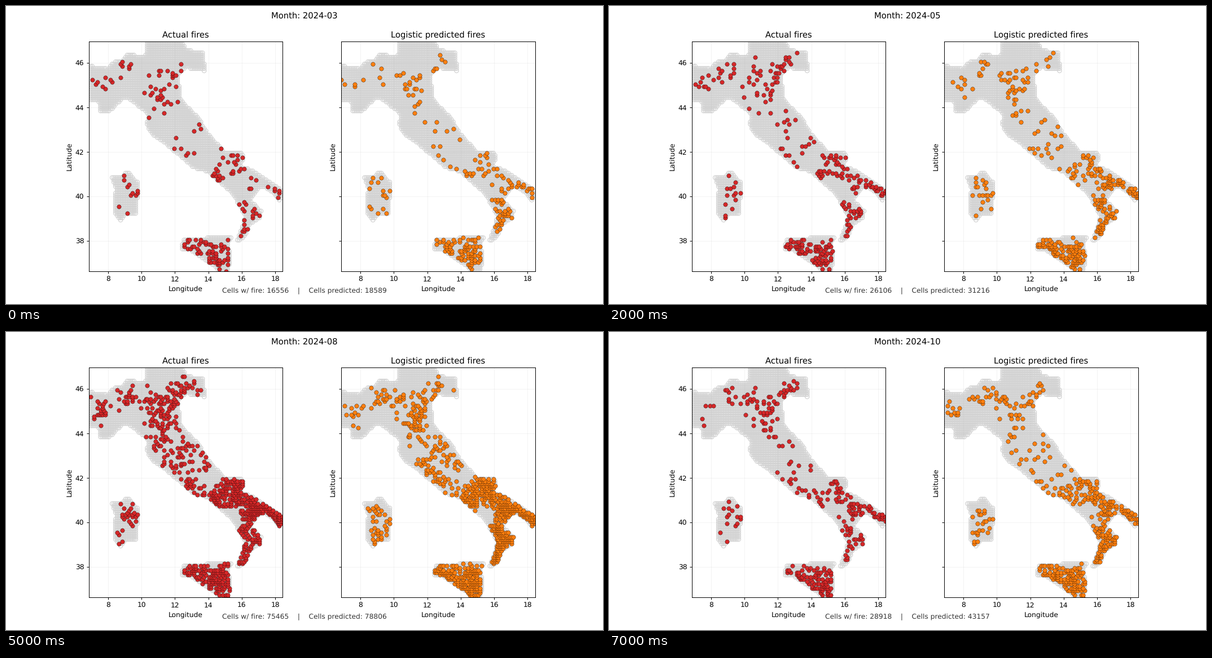
A matplotlib script that plays this animation: 1058x529 px, repeating every 8000 ms.

```python
import numpy as np
import matplotlib.pyplot as plt
from matplotlib.animation import FuncAnimation
from matplotlib.path import Path

plt.rcParams["font.family"] = "DejaVu Sans"
plt.rcParams["text.hinting"] = "none"

WEST, EAST, SOUTH, NORTH = 6.85, 18.45, 36.65, 46.95
MID_LATITUDE = 41.5
CELL = 0.1

# Fire totals from March to October
ACTUAL = [16556, 19874, 26106, 38425, 56073, 75465, 44180, 28918]
PREDICTED = [18589, 23147, 31216, 45902, 65250, 78806, 75644, 43157]
PEAK = 75000

# Coast corners in stage pixels of the left panel
MAINLAND = [
    (247, 58), (313, 58), (322, 76), (351, 78), (357, 119), (318, 113),
    (308, 122), (313, 166), (347, 202), (360, 226), (388, 256), (417, 257),
    (426, 267), (418, 282), (440, 290), (497, 329), (497, 345), (482, 348),
    (466, 328), (450, 326), (436, 345), (455, 364), (452, 379), (432, 391),
    (430, 406), (411, 423), (406, 417), (421, 375), (401, 336), (357, 297),
    (334, 291), (288, 252), (255, 227), (247, 212), (249, 192), (220, 169),
    (208, 167), (184, 190), (161, 193), (165, 172), (141, 169), (141, 102),
    (182, 109), (184, 97), (208, 95), (211, 83), (247, 86)]
SARDINIA = [
    (215, 289), (224, 300), (238, 314), (234, 371), (213, 372), (203, 385),
    (190, 370), (192, 322), (184, 302), (205, 300)]
SICILY = [
    (312, 411), (405, 406), (397, 421), (401, 452), (394, 478), (383, 478),
    (360, 458), (330, 438), (307, 434)]


def land_cells():
    lon, lat = np.meshgrid(np.arange(WEST, EAST + CELL / 2, CELL),
                           np.arange(SOUTH, NORTH + CELL / 2, CELL))
    cells = np.column_stack([lon.ravel(), lat.ravel()])
    spots = (cells - (8, 38)) * (29.57, -39.53) + (181.3, 417.5)
    inside = np.zeros(len(cells), bool)
    for outline in (MAINLAND, SARDINIA, SICILY):
        path = Path(outline)
        # keep cells whose whole ring fits inside the coast
        inside |= np.all([path.contains_points(spots + step) for step in
                          ((3, 0), (-3, 0), (0, 3), (0, -3))], axis=0)
    return cells[inside], spots[inside]


CELLS, SPOTS = land_cells()
HABIT = np.random.default_rng(7).gumbel(size=len(CELLS))


class Region:
    """Hotspots whose number of burning cells grows as a power of the total."""

    def __init__(self, centers, spread, peaks, growth):
        distance = np.linalg.norm(SPOTS[:, None] - np.array(centers), axis=2)
        heat = np.exp(-(distance / spread) ** 2 / 2).sum(axis=1)
        self.score = np.log(heat + 1e-12)
        self.peaks, self.growth = peaks, growth

    def pick(self, panel, total, noise):
        count = round(self.peaks[panel] * (total / PEAK) ** self.growth)
        return np.argsort(-(self.score + noise))[:count]


REGIONS = [
    Region([(212, 117), (172, 140), (255, 123), (292, 122), (265, 150),
            (282, 158), (320, 100)], 11, (150, 105), 0.8),             # north
    Region([(275, 190), (315, 205), (297, 243), (318, 265), (345, 286),
            (356, 235)], 13, (95, 85), 1.3),                           # centre
    Region([(395, 270), (412, 290), (372, 298), (437, 305), (436, 325),
            (462, 316), (480, 325), (485, 335)], 11, (230, 235), 1.2),  # south
    Region([(424, 352), (446, 370), (424, 385), (418, 402)],
           8, (60, 100), 0.8),                                         # Calabria
    Region([(325, 424), (345, 434), (370, 445), (384, 430), (388, 460)],
           11, (130, 150), 0.5),                                       # Sicily
    Region([(208, 362), (210, 318), (228, 335)], 11, (26, 34), 0.6),   # Sardinia
]


def burning_cells(panel, month, total):
    rng = np.random.default_rng(100 + 2 * month + panel)
    noise = 0.8 * rng.gumbel(size=len(CELLS)) + 0.6 * HABIT
    picked = [region.pick(panel, total, noise) for region in REGIONS]
    return CELLS[np.unique(np.concatenate(picked))]


fig, axes = plt.subplots(1, 2, figsize=(12, 6), dpi=1058 / 12, sharey=True)


def make_panel(ax, title, color):
    ax.scatter(*CELLS.T, s=36, facecolors="none", edgecolors="lightgray", linewidths=1)
    fires = ax.scatter([], [], s=36, c=color, edgecolors="black", linewidths=0.3)
    ax.set(title=title, xlabel="Longitude", ylabel="Latitude",
           xlim=(WEST, EAST), ylim=(SOUTH, NORTH),
           xticks=range(8, 19, 2), yticks=range(38, 47, 2),
           aspect=1 / np.cos(np.radians(MID_LATITUDE)))
    ax.grid(True, alpha=0.15)
    return fires


layers = [make_panel(axes[0], "Actual fires", "#d62728"),
          make_panel(axes[1], "Logistic predicted fires", "#ff7f0e")]
heading = fig.suptitle("")
footer = fig.text(0.5, 20 / 529, "", ha="center", fontsize=10, color="#333333")


def update(month):
    totals = ACTUAL[month], PREDICTED[month]
    for panel, fires in enumerate(layers):
        fires.set_offsets(burning_cells(panel, month, totals[panel]))
    heading.set_text(f"Month: 2024-{month + 3:02d}")
    footer.set_text("Cells w/ fire: {}    |    Cells predicted: {}".format(*totals))
    return [*layers, heading, footer]


animation = FuncAnimation(fig, update, frames=len(ACTUAL), interval=1000, repeat=True)
plt.show()
```
